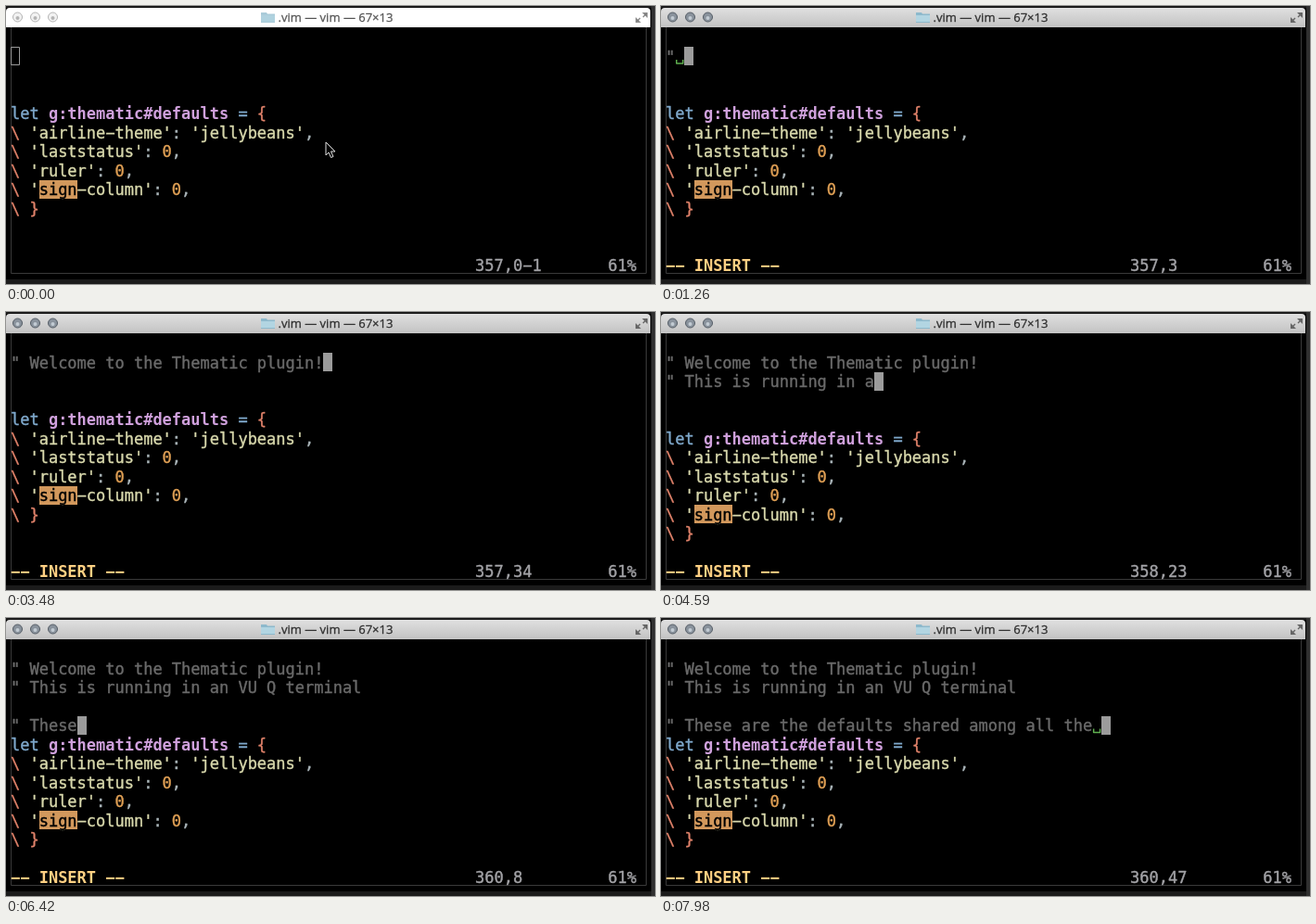
Recreate the animation shown at these times as an HTML page with a canvas. Size 700 px wide and 300 px high, loop 8 s.

```html
<!DOCTYPE html>
<html lang="en">
<head>
<meta charset="utf-8">
<title>Terminal session</title>
<style>
html, body { margin: 0; width: 700px; height: 300px; overflow: hidden; background: #000; }
canvas { display: block; }
</style>
</head>
<body>
<canvas id="stage" width="700" height="300"></canvas>
<script>
const ctx = document.getElementById('stage').getContext('2d');
const LOOP = 8000;
const CELL_W = 10.225, CELL_H = 20.5, LEFT = 5, TOP = 23.5;
const MONO = '17px "DejaVu Sans Mono", monospace';
const color = {
  comment: '#6a6a6a', keyword: '#7fa9cc', name: '#cfa0dc', string: '#d8d8ac',
  punct: '#a9b4b8', special: '#e0826a', number: '#e0a055', match: '#d2985c',
  mode: '#ffd083', ruler: '#a2a2a6', cursor: '#9b9b9b', trail: '#5fb04f'
};

// Each comment line: its row, text, and [time, characters typed] points.
const comments = [
  { row: 1, text: '" Welcome to the Thematic plugin!', keys: [[1080, 0], [1245, 2], [3380, 33]] },
  { row: 2, text: '" This is running in an VU Q terminal', keys: [[3600, 0], [4575, 22], [5440, 37]] },
  { row: 4, text: '" These are the defaults shared among all the ', keys: [[6140, 0], [6975, 21], [7965, 46]] }
];
const FOCUS = 450, INSERT = 900, NEWLINE = 3570, ESCAPE = 5640, NORMAL = 5760,
      DOWN_ONE = 5880, DOWN_TWO = 6000, INSERT_AGAIN = 6090;

const colX = col => LEFT + col * CELL_W;
const rowY = row => TOP + row * CELL_H;

function typedCount(keys, t) {
  let count = 0;
  for (let i = 1; i < keys.length; i++) {
    const [t0, n0] = keys[i - 1], [t1, n1] = keys[i];
    if (t >= t0) count = Math.floor(n0 + (n1 - n0) * Math.min(1, (t - t0) / (t1 - t0)));
  }
  return count;
}

// Terminal glyphs get a hairline outline, like smoothed text on a dark screen.
function put(row, col, text, fill, bold = false) {
  ctx.font = (bold ? 'bold ' : '') + MONO;
  ctx.fillStyle = ctx.strokeStyle = fill;
  ctx.lineWidth = 0.4;
  ctx.lineJoin = 'round';
  [...text.replace(/-/g, '\u2212')].forEach((ch, i) => {
    const x = colX(col + i), y = rowY(row) + 16.5;
    ctx.fillText(ch, x, y);
    if (!bold) ctx.strokeText(ch, x, y);
  });
  return col + text.length;
}

function block(row, col, width, fill) {
  const x = Math.round(colX(col)), y = Math.round(rowY(row));
  ctx.fillStyle = fill;
  ctx.fillRect(x, y, Math.round(width * CELL_W), 20);
}

function disc(x, y, r, fill, stroke) {
  ctx.beginPath();
  ctx.arc(x, y, r, 0, Math.PI * 2);
  ctx.fillStyle = fill;
  ctx.fill();
  ctx.strokeStyle = stroke;
  ctx.lineWidth = 1;
  ctx.stroke();
}

function path(points) {
  ctx.beginPath();
  points.forEach(([x, y]) => ctx.lineTo(x, y));
}

function polygon(points, fill) {
  path(points);
  ctx.closePath();
  ctx.fillStyle = fill;
  ctx.fill();
}

function line(points, stroke, width) {
  path(points);
  ctx.strokeStyle = stroke;
  ctx.lineWidth = width;
  ctx.stroke();
}

function drawWindow(active) {
  ctx.fillStyle = '#000';
  ctx.fillRect(0, 0, 700, 300);
  ctx.fillStyle = '#1b1b1b';
  ctx.fillRect(0, 0, 700, 2);
  ctx.fillRect(0, 295, 700, 5);
  ctx.fillStyle = '#303030';
  ctx.fillRect(696, 0, 4, 300);

  const bar = ctx.createLinearGradient(0, 2, 0, 23);
  bar.addColorStop(0, active ? '#e0e0e0' : '#fff');
  bar.addColorStop(1, active ? '#c2c2c2' : '#fff');
  ctx.fillStyle = bar;
  ctx.beginPath();
  ctx.roundRect(0, 2, 695, 21, [4, 4, 0, 0]);
  ctx.fill();

  for (const x of [12.5, 31.5, 50.5]) {
    disc(x, 12, 5, active ? '#89929c' : '#f2f2f2', active ? '#555d66' : '#b4b4b4');
    disc(x, 13, 2, active ? '#c2cbd3' : '#b4b4b4', 'transparent');
  }

  ctx.globalAlpha = active ? 1 : 0.75;
  polygon([[275, 7], [281, 7], [282, 8.5], [290, 8.5], [290, 18], [275, 18]], '#8db9cc');
  ctx.fillStyle = '#b2d5e2';
  ctx.fillRect(275, 10, 15, 7);
  ctx.font = '13px "Open Sans", "Noto Sans", sans-serif';
  ctx.fillStyle = ctx.strokeStyle = '#303030';
  ctx.lineWidth = 0.3;
  ctx.fillText('.vim — vim — 67×13', 293.5, 17);
  ctx.strokeText('.vim — vim — 67×13', 293.5, 17);
  polygon([[686, 7], [692, 7], [692, 13]], '#666');
  polygon([[679, 12], [685, 18], [679, 18]], '#666');
  line([[690, 9], [687, 12]], '#666', 1.5);
  line([[681, 16], [684, 13]], '#666', 1.5);
  ctx.globalAlpha = 1;

  line([[5.5, 23], [5.5, 288.5], [690.5, 288.5], [690.5, 23]], '#3a3a3a', 1);
}

function drawSettings(top) {
  put(top, 0, 'let', color.keyword);
  put(top, 4, 'g:thematic#defaults', color.name, true);
  put(top, 24, '=', color.keyword);
  put(top, 26, '{', color.special);
  const entries = [['airline-theme', "'jellybeans'"], ['laststatus', '0'], ['ruler', '0'], ['sign-column', '0']];
  entries.forEach(([key, value], i) => {
    const row = top + 1 + i;
    put(row, 0, '\\', color.special);
    let col = put(row, 2, `'${key}'`, color.string);
    col = put(row, col, ': ', color.punct);
    col = put(row, col, value, value === '0' ? color.number : color.string);
    put(row, col, ',', color.punct);
  });
  block(top + 4, 3, 4, color.match);
  put(top + 4, 3, 'sign', '#000');
  put(top + 5, 0, '\\ }', color.special);
}

function drawComment(text, row) {
  const body = text.trimEnd();
  put(row, 0, body, color.comment);
  if (text.length > body.length) {
    const x = colX(body.length), y = rowY(row) + 18;
    line([[x + 1.5, y - 4], [x + 1.5, y], [x + 8.5, y], [x + 8.5, y - 4]], color.trail, 1.5);
  }
}

function drawPointer() {
  polygon([[345, 147], [345, 161], [348, 158], [350.5, 163.5], [353, 162.5], [350.5, 157], [355, 157]], '#000');
  ctx.strokeStyle = '#e0e0e0';
  ctx.lineWidth = 1;
  ctx.stroke();
}

function draw(t) {
  const active = t >= FOCUS;
  const inserting = (t >= INSERT && t < ESCAPE) || t >= INSERT_AGAIN;
  const escaping = t >= ESCAPE && t < NORMAL;
  const lines = comments.map(c => c.text.slice(0, typedCount(c.keys, t)));

  drawWindow(active);
  drawSettings(t < NEWLINE ? 4 : 5);
  lines.forEach((text, i) => drawComment(text, comments[i].row));

  const row = t < NEWLINE ? 1 : t < DOWN_ONE ? 2 : t < DOWN_TWO ? 3 : 4;
  const current = lines[comments.findIndex(c => c.row === row)] || '';
  const col = inserting ? current.length : Math.max(0, current.length - 1);

  if (escaping) {
    put(12, 39, '^[', color.ruler);
  } else {
    if (active) {
      block(row, col, 1, color.cursor);
      put(row, col, current[col] || '', '#000');
    } else {
      ctx.strokeStyle = color.cursor;
      ctx.lineWidth = 1;
      ctx.strokeRect(5.5, 44.5, 9, 19);
    }
    const column = inserting || current ? col + 1 : '0-1';
    put(12, 49, `${356 + row},${column}`, color.ruler);
    put(12, 63, '61%', color.ruler);
  }
  if (inserting) put(12, 0, '-- INSERT --', color.mode, true);
  if (t < INSERT) drawPointer();
}

const start = performance.now();
function tick() {
  draw((performance.now() - start) % LOOP);
  requestAnimationFrame(tick);
}
tick();
</script>
</body>
</html>
```
